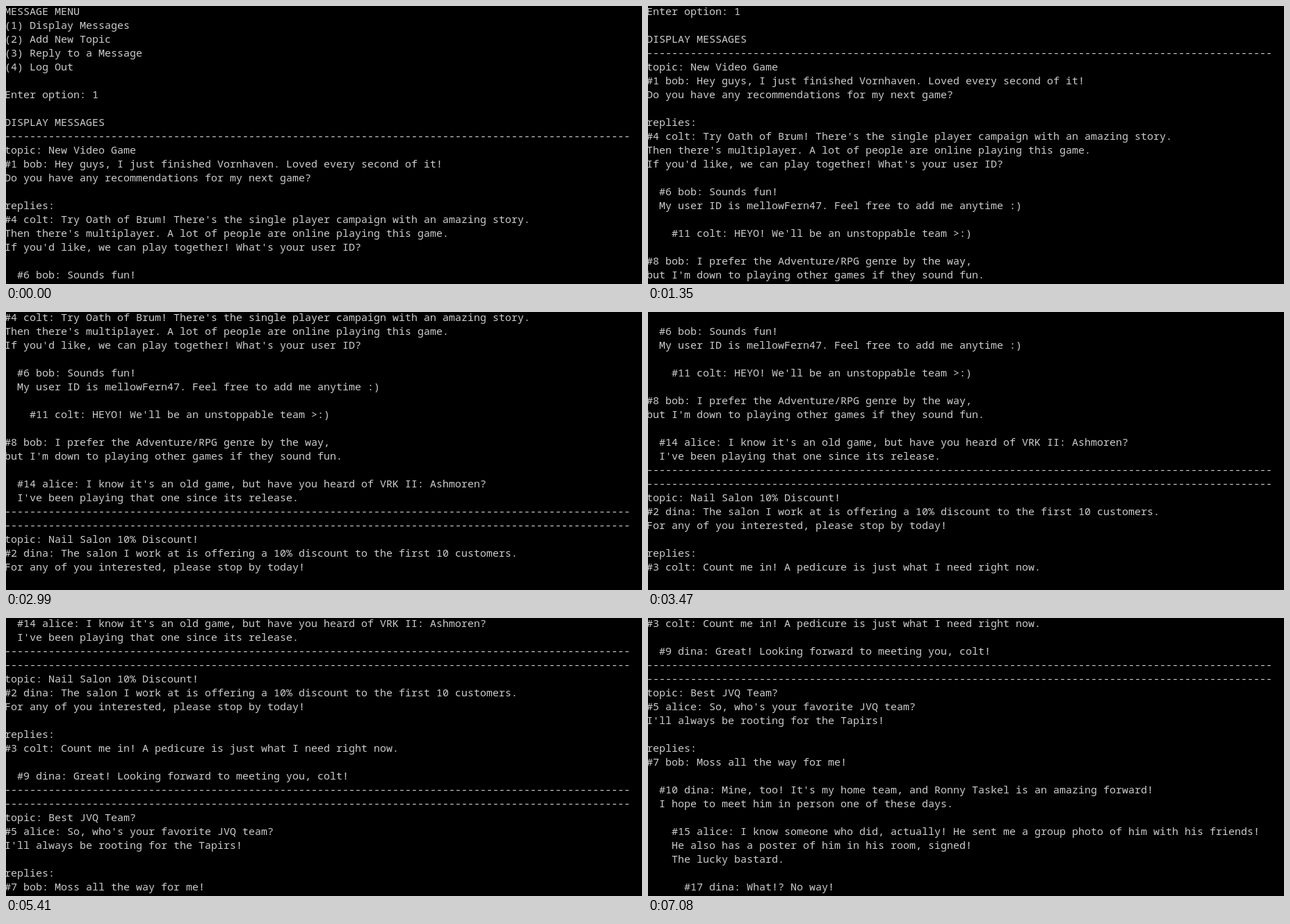
Recreate the animation shown at these times as an HTML page. Size 915 by 401 pixels, loop 8 s.

```html
<!DOCTYPE html>
<html lang="en">
<head>
<meta charset="utf-8">
<title>Message board console</title>
<style>
html, body {
  margin: 0;
  width: 100%;
  height: 100%;
  overflow: hidden;
  background: #000;
}
#screen {
  position: relative;
  width: 100%;
  height: 100%;
  overflow: hidden;
  contain: strict;
}
#log {
  position: absolute;
  left: -2px;
  top: -3px;
  margin: 0;
  color: #ccc;
  font: 15px/20px "Noto Sans Mono", "DejaVu Sans Mono", monospace;
  white-space: pre;
  --notch: -60px; /* one wheel notch is three lines */
  animation: scroll 8s step-end infinite;
}
@keyframes scroll {
  0%      { transform: translateY(0); }
  6.25%   { transform: translateY(calc(var(--notch) * 1)); }
  16.875% { transform: translateY(calc(var(--notch) * 2)); }
  26.625% { transform: translateY(calc(var(--notch) * 3)); }
  30.375% { transform: translateY(calc(var(--notch) * 4)); }
  37.375% { transform: translateY(calc(var(--notch) * 5)); }
  43.375% { transform: translateY(calc(var(--notch) * 6)); }
  55.5%   { transform: translateY(calc(var(--notch) * 7)); }
  61.25%  { transform: translateY(calc(var(--notch) * 8)); }
  67.625% { transform: translateY(calc(var(--notch) * 9)); }
  77.125% { transform: translateY(calc(var(--notch) * 10)); }
  82.5%   { transform: translateY(calc(var(--notch) * 11)); }
  88.5%, 100% { transform: translateY(calc(var(--notch) * 12)); }
}
</style>
</head>
<body>
<div id="screen"><pre id="log">
MESSAGE MENU
(1) Display Messages
(2) Add New Topic
(3) Reply to a Message
(4) Log Out

Enter option: 1

DISPLAY MESSAGES
=
topic: New Video Game
#1 bob: Hey guys, I just finished Vornhaven. Loved every second of it!
Do you have any recommendations for my next game?

replies:
#4 colt: Try Oath of Brum! There's the single player campaign with an amazing story.
Then there's multiplayer. A lot of people are online playing this game.
If you'd like, we can play together! What's your user ID?

  #6 bob: Sounds fun!
  My user ID is mellowFern47. Feel free to add me anytime :)

    #11 colt: HEYO! We'll be an unstoppable team &gt;:)

#8 bob: I prefer the Adventure/RPG genre by the way,
but I'm down to playing other games if they sound fun.

  #14 alice: I know it's an old game, but have you heard of VRK II: Ashmoren?
  I've been playing that one since its release.
=
=
topic: Nail Salon 10% Discount!
#2 dina: The salon I work at is offering a 10% discount to the first 10 customers.
For any of you interested, please stop by today!

replies:
#3 colt: Count me in! A pedicure is just what I need right now.

  #9 dina: Great! Looking forward to meeting you, colt!
=
=
topic: Best JVQ Team?
#5 alice: So, who's your favorite JVQ team?
I'll always be rooting for the Tapirs!

replies:
#7 bob: Moss all the way for me!

  #10 dina: Mine, too! It's my home team, and Ronny Taskel is an amazing forward!
  I hope to meet him in person one of these days.

    #15 alice: I know someone who did, actually! He sent me a group photo of him with his friends!
    He also has a poster of him in his room, signed!
    The lucky bastard.

      #17 dina: What!? No way!</pre></div>
<script>
// Expand each "=" line into a full-width rule.
const log = document.getElementById('log');
log.textContent = log.textContent.replace(/^=$/gm, '-'.repeat(100));
</script>
</body>
</html>
```
